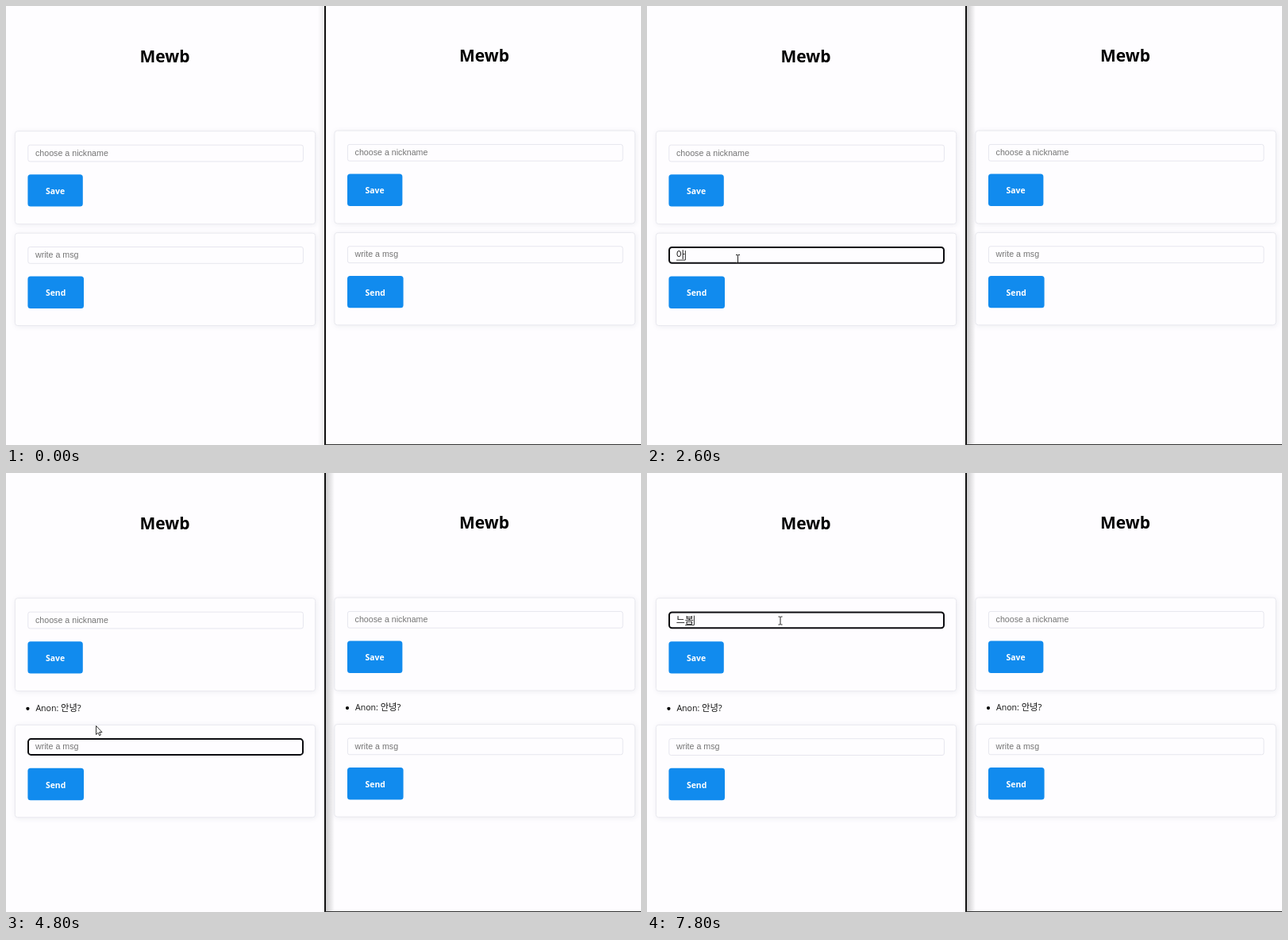
Recreate the animation shown at these times as an HTML page. Size 800 by 553 pixels, loop 8000 ms.

```html
<!DOCTYPE html>
<html lang="ko">
<head>
<meta charset="utf-8">
<title>Chat in two windows</title>
<style>
  html, body { margin: 0; width: 100%; height: 100%; overflow: hidden; background: #fefdff; }
  svg { display: block; width: 100vw; height: 100vh; }
  text { white-space: pre; }
  .title { font: 700 21px "Open Sans", "Noto Sans", sans-serif; text-anchor: middle; }
  .label { font: 700 10.4px "Open Sans", "Noto Sans", sans-serif; fill: #fff; }
  .hint { font: 10.67px "Liberation Sans", Arial, sans-serif; fill: #757575; }
  .typed { font: 12px "Noto Sans CJK KR", "Noto Sans CJK JP", "Noto Sans CJK", sans-serif; fill: #111; }
  .chat { font: 10.6px "Open Sans", "Noto Sans CJK KR", "Noto Sans CJK JP", sans-serif; fill: #111; }
  .chat tspan { font-size: 11.3px; }
  .card { fill: #fefdff; stroke: #e8e8ee; filter: drop-shadow(1px 1px 3px #eeeef2); }
  .field { fill: #fefdff; stroke: #e6e6ee; }
  .focus { fill: #fefdff; stroke: #0c0c10; stroke-width: 2; }
  .button { fill: #118bee; }
</style>
</head>
<body>
<svg viewBox="0 0 800 553" preserveAspectRatio="none">
  <defs>
    <linearGradient id="shadeRight">
      <stop stop-color="#000" stop-opacity=".2"/><stop offset="1" stop-color="#000" stop-opacity="0"/>
    </linearGradient>
    <linearGradient id="shadeLeft">
      <stop stop-color="#000" stop-opacity="0"/><stop offset="1" stop-color="#000" stop-opacity=".08"/>
    </linearGradient>
  </defs>
  <g id="scene"></g>
</svg>
<script>
const LOOP = 8000, STEP = 200;
const CLICK_MESSAGE = 1600, SEND = 3800, CLICK_NAME = 5800;
const MESSAGE = { start: 2400, states: ["ㅇ", "아", "안", "안ㄴ", "안녀", "안녕", "안녕?"] };
const NAME = { start: 7000, states: ["ㄴ", "느", "늡", "느보", "느봄"] };
const scene = document.getElementById("scene");

const typedAt = (t, { start, states }) =>
  t < start ? "" : states[Math.min(states.length - 1, Math.floor((t - start) / STEP))];

const textWidth = s => [...s].reduce((w, c) => w + (c === "?" ? 5.8 : 11.04), 0);

function field(y, hint, { value = "", focused = false, caret = false }) {
  const end = 37 + textWidth(value);
  const box = focused
    ? `<rect class="focus" x="28" y="${y + .8}" width="346" height="19.8" rx="3.5"/>`
    : `<rect class="field" x="27.8" y="${y + .4}" width="346.6" height="20.8" rx="2.5"/>`;
  const text = value
    ? `<text class="typed" x="36.8" y="${y + 15}">${value}</text>`
    : `<text class="hint" x="37" y="${y + 14}">${hint}</text>`;
  const underline = value && !value.endsWith("?")
    ? `<path d="M${end - 11} ${y + 17}H${end}" stroke="#222" stroke-width=".9"/>` : "";
  const bar = caret ? `<path d="M${end + .3} ${y + 5}v12" stroke="#111" stroke-width=".9"/>` : "";
  return box + text + underline + bar;
}

function card(y, height, hint, label, buttonWidth, input) {
  return `<rect class="card" x="11.3" y="${y}" width="378.4" height="${height}" rx="3.5"/>
    ${field(y + 17, hint, input)}
    <rect class="button" x="27.4" y="${y + 54.5}" width="${buttonWidth}" height="40.4" rx="3.5"/>
    <text class="label" x="50" y="${y + 79.2}">${label}</text>`;
}

function pane(x, y, sent, name = {}, message = {}) {
  const line = sent ? `<circle cx="27.4" cy="296.8" r="2.1"/>
    <text class="chat" x="37.4" y="300">Anon: <tspan>안녕?</tspan></text>` : "";
  return `<g transform="translate(${x} ${y})">
    <text class="title" x="200" y="71">Mewb</text>
    ${card(157.7, 117, "choose a nickname", "Save", 69.4, name)}
    ${line}
    ${card(sent ? 317.3 : 286.1, 116.5, "write a msg", "Send", 70.6, message)}
  </g>`;
}

function pointer(t) {
  if (t < 1400) return "";
  const arrow = (x, y) => `<path transform="translate(${x} ${y})" fill="#fff" stroke="#222" stroke-width=".9"
    d="M.5 .5v11l2.5-2.3 1.7 3.6 1.6-.8-1.7-3.5h3.4z"/>`;
  const beam = (x, y) => `<path transform="translate(${x} ${y})" fill="none" stroke="#222"
    d="M-2.5-5h2l.5.5.5-.5h2M0-4.5v9M-2.5 5h2l.5-.5.5.5h2"/>`;
  if (t < CLICK_MESSAGE) return arrow(128, 442);
  if (t < SEND) return beam(114.5, 318.5);
  if (t < 5400) {
    const p = Math.max(0, (t - 4800) / 600);
    const ease = p * p * (3 - 2 * p);
    return arrow(113 + 56 * ease, 318 - 131 * ease);
  }
  return t < CLICK_NAME ? beam(169, 187) : beam(168, 186);
}

function ripple(t, click, x, y) {
  const age = t - click;
  if (age < 0 || age >= 400) return "";
  return `<circle cx="${x}" cy="${y}" r="${age ? 17.5 : 12}" fill="#000" fill-opacity="${age ? .008 : .05}"
    stroke="#000" stroke-opacity="${age ? .035 : .06}"/>`;
}

function draw(t) {
  const sent = t >= SEND;
  const active = t >= CLICK_MESSAGE;
  const onName = t >= CLICK_NAME;
  const name = typedAt(t, NAME);
  const message = sent ? "" : typedAt(t, MESSAGE);
  const focusStart = onName ? CLICK_NAME : sent ? SEND : CLICK_MESSAGE;
  const caret = active && (!!(name || message) || Math.floor((t - focusStart) / 300) % 2 === 0);

  scene.innerHTML = `<rect width="800" height="553" fill="#fefdff"/>
    ${pane(0, 0, sent,
      { value: name, focused: onName, caret: onName && caret },
      { value: message, focused: active && !onName, caret: !onName && caret })}
    ${pane(402.6, -.7, sent)}
    ${active
      ? '<rect x="403" width="11" height="553" fill="url(#shadeRight)"/>'
      : '<rect x="393" width="8" height="553" fill="url(#shadeLeft)"/>'}
    <rect x="401" width="2" height="553" fill="#111"/>
    <rect x="402" y="552" width="398" height="1" fill="#333"/>
    ${ripple(t, CLICK_MESSAGE, 114, 318)}${ripple(t, CLICK_NAME, 168, 186)}
    ${pointer(t)}`;
}

let shown = -1;
function tick() {
  const t = Math.floor(performance.now() % LOOP / STEP) * STEP;
  if (t !== shown) draw(shown = t);
  requestAnimationFrame(tick);
}
tick();
</script>
</body>
</html>
```
